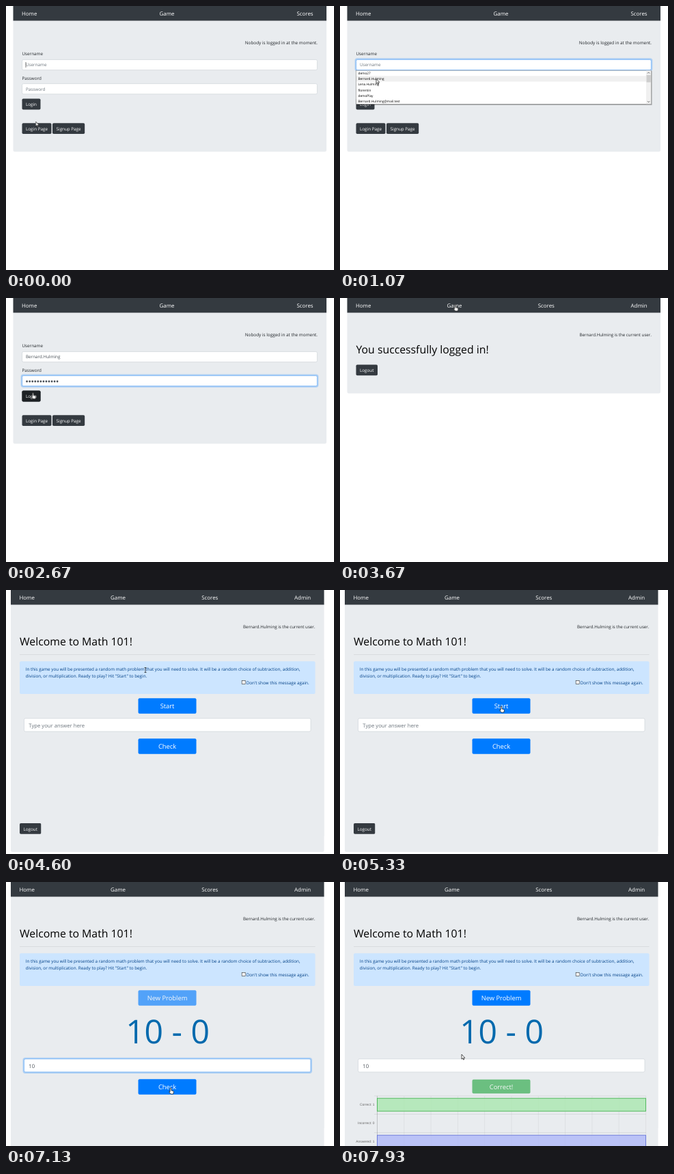
These frames come from a looping animation (480x386 px, 8 s). An HTML page:

```html
<!DOCTYPE html>
<html lang="en">
<head>
<meta charset="utf-8">
<title>Login and math game</title>
<style>
html, body { margin: 0; width: 100%; height: 100%; overflow: hidden; background: #fff; }
svg { display: block; width: 480px; height: 386px; }
text { font: 6.3px "Open Sans", "Noto Sans", sans-serif; fill: #212529; text-rendering: geometricPrecision; white-space: pre; }
.nav text { font-size: 7.9px; fill: #fff; }
.mid { text-anchor: middle; }
.end { text-anchor: end; }
.dark { fill: #343a40; }
.panel { fill: #e9ecef; }
.blue { fill: #007bff; }
.field { fill: #fff; stroke: #ced4da; stroke-width: .7; }
.caret { stroke: #222; stroke-width: .6; }
text.btn { fill: #fff; text-anchor: middle; }
text.h { font-size: 15.8px; fill: #000; }
text.big { font-size: 9.35px; }
text.ph { fill: #6c757d; }
text.val { fill: #495057; }
.ans text { font-size: 7.7px; }
.note text { fill: #004085; }
.list text { font-size: 4.75px; fill: #000; }
.chart text { font: 4.9px "Liberation Sans", Arial, sans-serif; fill: #666; text-anchor: end; }
.ring rect { fill: none; stroke: #80bdff; stroke-width: .8; }
.ring rect:first-child { stroke: #007bff; stroke-opacity: .25; stroke-width: 2.2; }

.v, .move { animation: 8s step-end infinite; }
.v { opacity: 0; }
@keyframes login { 0% { opacity: 1 } 35.875% { opacity: 0 } }
@keyframes done { 0% { opacity: 0 } 35.875% { opacity: 1 } 51.625% { opacity: 0 } }
@keyframes game { 0% { opacity: 0 } 51.625%, 100% { opacity: 1 } }

@keyframes ringUser {
  0%, 3.75% { opacity: 0; animation-timing-function: linear }
  5.6% { opacity: 1 } 19.5% { opacity: 0 }
}
@keyframes ringPass {
  0%, 20.25% { opacity: 0; animation-timing-function: linear }
  22%, 100% { opacity: 1 }
}
@keyframes caretUser { 0% { opacity: 1 } 11.6% { opacity: 0 } }
@keyframes list { 0% { opacity: 0 } 8.6% { opacity: 1 } 17.1% { opacity: 0 } }
@keyframes phUser { 0% { opacity: 1 } 17.1% { opacity: 0 } }
@keyframes valUser { 0% { opacity: 0 } 17.1%, 100% { opacity: 1 } }
@keyframes phPass { 0% { opacity: 1 } 20.5% { opacity: 0 } }
@keyframes dots {
  0%, 20.5% { transform: none; animation-timing-function: steps(12) }
  28.5%, 100% { transform: translateX(48.6px) }
}
@keyframes hover { 0% { opacity: 0 } 31.6%, 100% { opacity: 1 } }

@keyframes before { 0% { opacity: 1 } 67.5% { opacity: 0 } }
@keyframes after { 0% { opacity: 0 } 67.5%, 100% { opacity: 1 } }
@keyframes fresh { 0% { opacity: 0 } 67.5% { opacity: .65 } 91.9%, 100% { opacity: 1 } }
@keyframes drop { 0% { transform: none } 67.5%, 100% { transform: translateY(71px) } }
@keyframes ringAns {
  0%, 67.5% { opacity: 0; animation-timing-function: linear }
  69.3% { opacity: 1 } 90.6% { opacity: 0 }
}
@keyframes caretAns { 0% { opacity: 0 } 67.8% { opacity: 1 } 74.4% { opacity: 0 } 81% { opacity: 1 } 82.75% { opacity: 0 } }
@keyframes phAns { 0% { opacity: 1 } 82.75% { opacity: 0 } }
@keyframes key1 { 0% { opacity: 0 } 82.75%, 100% { opacity: 1 } }
@keyframes key2 { 0% { opacity: 0 } 84.75%, 100% { opacity: 1 } }
@keyframes check { 0% { opacity: 1 } 90.9% { opacity: 0 } }
@keyframes right { 0% { opacity: 0 } 90.9%, 100% { opacity: .65 } }
@keyframes chart { 0% { opacity: 0 } 92.5%, 100% { opacity: 1 } }
.bar { transform-box: fill-box; transform-origin: 0 0; animation: grow 8s infinite; }
@keyframes grow {
  0%, 92.5% { transform: scaleX(0); animation-timing-function: cubic-bezier(.165, .84, .44, 1) }
  98.75%, 100% { transform: none }
}

.cursor { animation: path 8s ease-in-out infinite; }
.cursor path { fill: #fff; stroke: #111; stroke-width: .7; stroke-linejoin: round; }
@keyframes path {
  0%, .9% { transform: translate(43.5px, 169px) }
  6.6%, 8.4% { transform: translate(55px, 85px) }
  12.5%, 19.1% { transform: translate(53px, 106.5px) }
  22.5%, 29.1% { transform: translate(70px, 120px) }
  32%, 35.9% { transform: translate(39.5px, 138.5px) }
  40%, 40.9% { transform: translate(254px, 24px) }
  45.9%, 55% { transform: translate(168.5px, 10px) }
  57.5% { transform: translate(204px, 117px) }
  62%, 67.5% { transform: translate(236px, 170px) }
  72%, 81.6% { transform: translate(217px, 230px) }
  87.5%, 92.5% { transform: translate(241px, 301px) }
  98.5%, 100% { transform: translate(178px, 252px) }
}
@keyframes arrow {
  0%, 9.5%, 35.9%, 55.3%, 93.5%, 100% { opacity: 1 }
  5.8%, 21%, 44.5%, 56.5% { opacity: 0 }
}
@keyframes beam {
  0%, 9.5%, 30.5%, 60%, 85.5%, 100% { opacity: 0 }
  5.8%, 21%, 56.5%, 69.5% { opacity: 1 }
}
@keyframes hand {
  0%, 35.9%, 55.3%, 69.5%, 93.5%, 100% { opacity: 0 }
  30.5%, 44.5%, 60%, 85.5% { opacity: 1 }
}
</style>
</head>
<body>
<svg viewBox="0 0 480 386">
  <defs>
    <g id="nav" class="nav">
      <rect class="dark" x="10.5" width="458.5" height="21.5"/>
      <text x="23" y="13.8">Home</text>
      <text class="mid" x="167.5" y="13.8">Game</text>
      <text class="mid" x="301.8" y="13.8">Scores</text>
      <text class="end" x="449.6" y="13.8">Admin</text>
      <text class="end" x="456" y="56" style="font-size:6.2px;fill:#212529">Bernard.Hulming is the current user.</text>
    </g>
    <g id="logout">
      <rect class="dark" x="23.5" y="97.5" width="31.5" height="15.8" rx="1.8"/>
      <text class="btn" x="39.2" y="108">Logout</text>
    </g>
    <g id="ring" class="ring">
      <rect x="22.7" y="77.4" width="433.6" height="17" rx="2.6"/>
      <rect x="23.6" y="78.4" width="431.8" height="15.2" rx="2"/>
    </g>
  </defs>

  <!-- login form -->
  <g class="v" style="animation-name:login">
    <path class="panel" d="M10.5 21H469V210.500q0 2.500-2.500 2.500H13q-2.500 0-2.500-2.500Z"/>
    <g class="nav">
      <rect class="dark" x="10.5" width="458.500" height="21.500"/>
      <text x="23" y="13.800">Home</text>
      <text class="mid" x="235.500" y="13.800">Game</text>
      <text class="end" x="449.600" y="13.800">Scores</text>
    </g>
    <text class="end" x="456" y="56" style="font-size:6.38px">Nobody is logged in at the moment.</text>
    <text x="23.500" y="72.300">Username</text>
    <text x="23.500" y="107.700">Password</text>
    <rect class="field" x="23.600" y="78.400" width="431.800" height="15.200" rx="2"/>
    <rect class="field" x="23.600" y="113.600" width="431.800" height="15.200" rx="2"/>
    <text class="ph v" style="animation-name:phUser" x="29" y="88.300">Username</text>
    <text class="val v" style="animation-name:valUser" x="29" y="88.300">Bernard.Hulming</text>
    <path class="caret v" style="animation-name:caretUser" d="M29 82v8"/>
    <path d="M30.600 122h45" stroke="#495057" stroke-width="2.800" stroke-linecap="round" stroke-dasharray="0 4.050"/>
    <rect class="move" style="animation-name:dots" x="28.500" y="117" width="50" height="9" fill="#fff"/>
    <text class="ph v" style="animation-name:phPass" x="29" y="123.800">Password</text>
    <g class="v" style="animation-name:ringUser"><use href="#ring"/></g>
    <g class="v" style="animation-name:ringPass"><use href="#ring" y="35.200"/></g>
    <rect class="dark" x="23.500" y="135.500" width="27" height="16" rx="1.800"/>
    <rect class="v" style="animation-name:hover" x="23.500" y="135.500" width="27" height="16" rx="1.800" fill="#1d2124"/>
    <text class="btn" x="37" y="146.100">Login</text>
    <rect class="dark" x="23.500" y="171.200" width="43" height="15.800" rx="1.800"/>
    <text class="btn" x="45" y="181.700">Login Page</text>
    <rect class="dark" x="68" y="171.200" width="47.200" height="15.800" rx="1.800"/>
    <text class="btn" x="91.600" y="181.700">Signup Page</text>

    <g class="list v" style="animation-name:list">
      <rect x="24.500" y="95" width="432" height="49.800" fill="#000" opacity=".35"/>
      <rect x="23.600" y="94.200" width="431.800" height="49.300" fill="#fff" stroke="#888" stroke-width=".6"/>
      <rect x="24" y="102.200" width="424" height="8.300" fill="#f0f0f0"/>
      <rect x="448" y="94.600" width="7.100" height="48.600" fill="#f0f0f0"/>
      <rect x="448.500" y="101" width="6.200" height="10.500" fill="#cdcdcd"/>
      <path d="M450 98.500l1.600-1.600 1.600 1.600M450 139.200l1.600 1.600 1.600-1.600" fill="none" stroke="#444" stroke-width=".8"/>
      <text x="26.500" y="99.800">demo27</text>
      <text x="26.500" y="108.100">Bernard.Hulming</text>
      <text x="26.500" y="116.400">Lena.Hulming</text>
      <text x="26.500" y="124.700">florentin</text>
      <text x="26.500" y="133">demoPlay</text>
      <text x="26.500" y="141.300">Bernard.Hulming@mail.test</text>
    </g>
  </g>

  <!-- logged in -->
  <g class="v" style="animation-name:done">
    <path class="panel" d="M10.500 21H469V137q0 2.500-2.500 2.500H13q-2.500 0-2.500-2.500Z"/>
    <use href="#nav"/>
    <text class="h" x="23.500" y="81.300">You successfully logged in!</text>
    <use href="#logout"/>
  </g>

  <!-- game -->
  <g class="v" style="animation-name:game">
    <rect class="panel move" style="animation-name:drop" x="7" y="100" width="458.500" height="283" rx="2.500"/>
    <rect class="panel" x="7" y="20" width="458.500" height="340"/>
    <use href="#nav" x="-3.500"/>
    <text class="h" x="20" y="81.300">Welcome to Math 101!</text>
    <path d="M20 94.500H452.500" stroke="#000" stroke-opacity=".1" stroke-width=".7"/>
    <g class="note">
      <rect x="20" y="104.300" width="432.500" height="47.700" rx="2" fill="#cce5ff"/>
      <text x="28.700" y="117.700">In this game you will be presented a random math problem that you will need to solve. It will be a random choice of subtraction, addition,</text>
      <text x="28.700" y="127.700">division, or multiplication. Ready to play? Hit "Start" to begin.</text>
      <rect x="345.200" y="132.500" width="5" height="5" fill="#fff" stroke="#444" stroke-width=".7"/>
      <text class="end" x="443.600" y="137.500">Don't show this message again.</text>
    </g>
    <g class="v" style="animation-name:before">
      <rect class="blue" x="193.500" y="158.300" width="85" height="22.500" rx="2"/>
      <text class="btn big" x="236" y="173.300">Start</text>
    </g>
    <g class="v" style="animation-name:fresh">
      <rect class="blue" x="193.500" y="158.300" width="85" height="22.500" rx="2"/>
      <text class="btn big" x="236" y="173.300">New Problem</text>
    </g>
    <text class="mid v" style="animation-name:after;font-size:48px;fill:#0069ad" x="236.500" y="236.300">10 - 0</text>

    <g class="move" style="animation-name:drop">
      <g class="ans">
        <rect class="field" x="26.500" y="187.700" width="419.500" height="19.200" rx="2"/>
        <g class="ring v" style="animation-name:ringAns">
          <rect x="25.600" y="186.800" width="421.300" height="21" rx="2.600"/>
          <rect x="26.500" y="187.700" width="419.500" height="19.200" rx="2"/>
        </g>
        <text class="ph v" style="animation-name:phAns" x="33.300" y="200.600">Type your answer here</text>
        <text class="val" x="33.300" y="200.600"><tspan class="v" style="animation-name:key1"></tspan></text>
        <text class="val v" style="animation-name:key1" x="33.300" y="200.600">1</text>
        <text class="val v" style="animation-name:key2" x="37.700" y="200.600">0</text>
        <path class="caret v" style="animation-name:caretAns" d="M33.600 192.500v9.500"/>
      </g>
      <g class="v" style="animation-name:check">
        <rect class="blue" x="193.500" y="217.300" width="85" height="22.400" rx="2"/>
        <text class="btn big" x="236" y="232.200">Check</text>
      </g>
      <g class="v" style="animation-name:right">
        <rect x="193.500" y="217.800" width="85" height="20.400" rx="2" fill="#28a745"/>
        <text class="btn big" x="236" y="231.600">Correct!</text>
      </g>
      <use class="v" style="animation-name:before" href="#logout" x="-3.500" y="243.500"/>
    </g>

    <g class="chart v" style="animation-name:chart">
      <path d="M50 312.800H448M50 339.500H448M50 366.500H448" stroke="#000" stroke-opacity=".12" stroke-width=".6"/>
      <path d="M94 312.800H448" stroke="#000" stroke-opacity=".09" stroke-width="150" stroke-dasharray=".6 38.700" clip-path="inset(0)" style="clip-path:polygon(0 0,100% 0,100% 100%,0 100%)" visibility="hidden"/>
      <path d="M93.800 313v73m39.300-73v73m39.300-73v73m39.300-73v73m39.300-73v73m39.300-73v73m39.300-73v73m39.300-73v73m39.300-73v73m39.300-73v73" fill="none" stroke="#000" stroke-opacity=".09" stroke-width=".6"/>
      <path d="M54.500 312.800V386" stroke="#000" stroke-opacity=".25" stroke-width=".7"/>
      <rect class="bar" x="54.500" y="316.200" width="393" height="18.900" fill="#9be6a0" fill-opacity=".65" stroke="#45b352" stroke-width=".9"/>
      <rect class="bar" x="54.500" y="370.200" width="393" height="18.900" fill="#a3aefa" fill-opacity=".65" stroke="#6474d8" stroke-width=".9"/>
      <text x="50.500" y="327">Correct: 1</text>
      <text x="50.500" y="354">Incorrect: 0</text>
      <text x="50.500" y="381">Answered: 1</text>
    </g>
  </g>

  <!-- pointer -->
  <g class="cursor">
    <path class="v" style="animation-name:arrow" d="M0 0V7L1.600 5.600 2.700 8 3.700 7.500 2.700 5.200H4.800Z"/>
    <path class="v" style="animation-name:beam;fill:none" d="M-1.500-3.500H1.500M0-3.500V3.500M-1.500 3.500H1.500"/>
    <path class="v" style="animation-name:hand" d="M-.9.800a.9.900 0 0 1 1.800 0V3.800l2.600.7q1 .3.900 1.300L3.800 9H0L-2.300 5.800q.3-1 1.400-.1Z"/>
  </g>
</svg>
</body>
</html>
```
